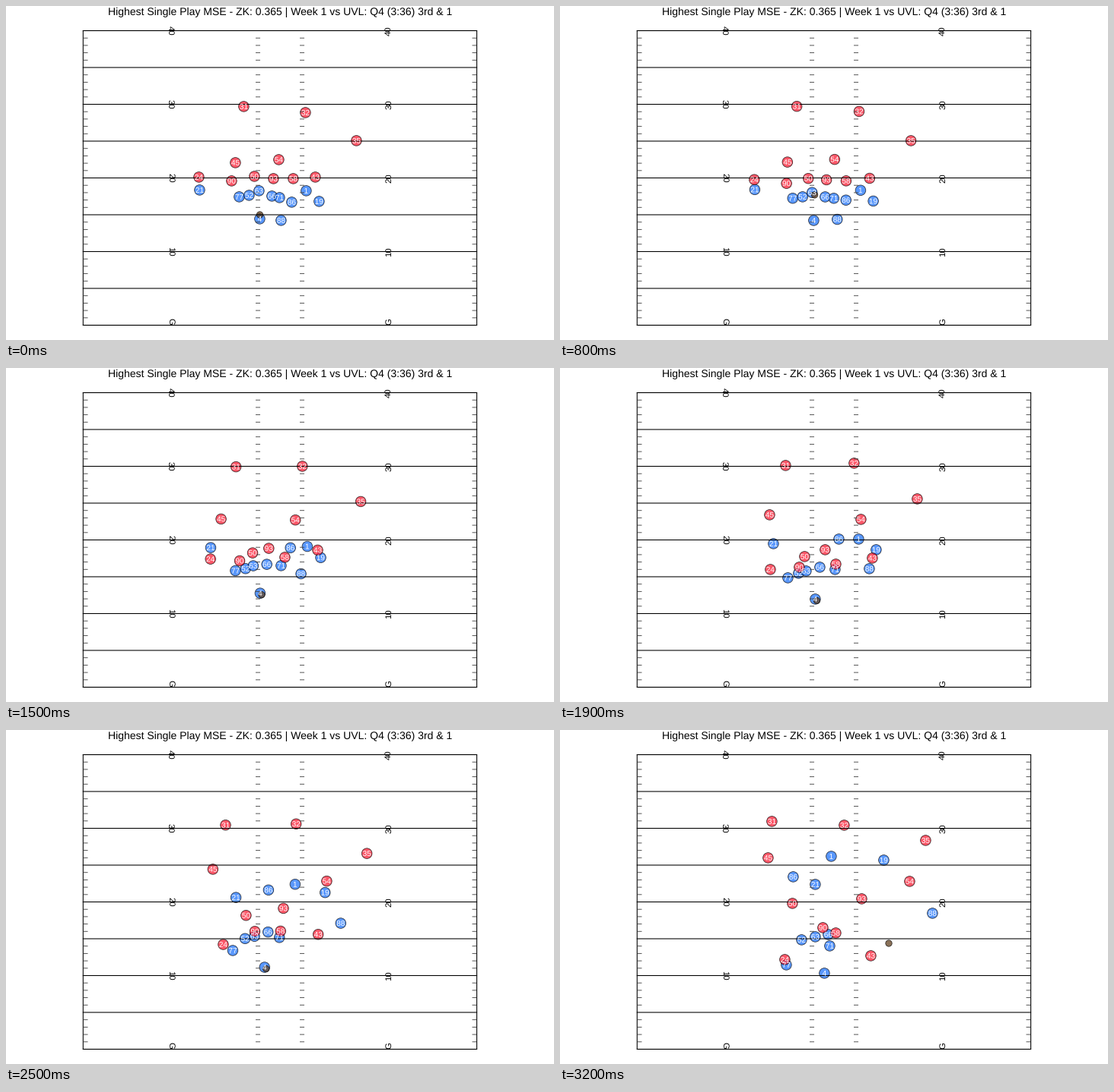
Write a matplotlib script that moves like this. It is 720 px wide and 440 px high and loops after 3.3 s.

```python
import numpy as np
import matplotlib.pyplot as plt
from matplotlib.animation import FuncAnimation
from matplotlib.patches import Circle, PathPatch, Rectangle
from matplotlib.textpath import TextPath
from matplotlib.transforms import Affine2D

W, H, DPI = 720, 440, 100
FRAMES, STEP = 33, 100
PX = 72 / DPI                                 # points per pixel
LEFT, RIGHT, TOP, GOAL = 101.3, 618.6, 32.5, 420.5
YARD = (GOAL - TOP) / 40
RED, BLUE, BROWN = "#fb1f35", "#2274fb", "#654321"

plt.rcParams["font.family"] = "Liberation Sans"
plt.rcParams["text.hinting"] = "none"
plt.rcParams["path.snap"] = False

# Key times (ms): players stand until SET, pass a midpoint at MID, stop at END
SET, MID, END = 500, 1900, 3200

# Jersey: stance, midpoint, finish
OFFENSE = {
    21: [(254, 242), (280, 231), (335, 203)],
    77: [(306, 251), (299, 276), (297, 309)],
    52: [(319, 249), (313, 270), (317, 276)],
    63: [(332, 243), (323, 267), (335, 272)],
    66: [(349, 250), (341, 262), (352, 269)],
    71: [(359, 252), (361, 265), (354, 284)],
    86: [(375, 258), (366, 225), (306, 193)],
    1: [(394, 243), (392, 225), (356, 166)],
    19: [(411, 257), (415, 239), (425, 171)],
    4: [(333, 280), (335, 304), (347, 320)],
    88: [(361, 282), (406, 264), (489, 241)],
}
DEFENSE = {
    24: [(253, 225), (276, 265), (295, 302)],
    90: [(296, 230), (314, 262), (345, 260)],
    50: [(326, 224), (321, 248), (305, 228)],
    93: [(351, 227), (348, 239), (396, 222)],
    58: [(377, 227), (362, 258), (362, 267)],
    43: [(406, 225), (410, 250), (408, 297)],
    45: [(301, 206), (275, 193), (273, 168)],
    54: [(358, 202), (395, 199), (459, 199)],
    31: [(312, 132), (296, 128), (278, 120)],
    32: [(393, 140), (386, 125), (373, 125)],
    35: [(460, 177), (469, 172), (480, 145)],
}
JERSEYS = [*OFFENSE, *DEFENSE]
KEYS = np.array([*OFFENSE.values(), *DEFENSE.values()]) + 0.4
CENTER, PASSER = JERSEYS.index(63), JERSEYS.index(4)

# Ball: drifts to the center, is snapped, carried by the passer, then thrown
SPOTTED, SNAP, CAUGHT, THROW = 400, 700, 1350, 2700
BALL_START, BALL_END = np.array([333.5, 275]), np.array([432, 281])


def run(t):
    """Positions of all players: ease out of the stance, then a smooth arc."""
    a, b, c = KEYS[:, 0], KEYS[:, 1], KEYS[:, 2]
    h1, h2 = MID - SET, END - MID
    d1, d2 = (b - a) / h1, (c - b) / h2
    v = (d1 * h2 + d2 * h1) / (h1 + h2)       # speed at the midpoint
    if t < MID:
        s = max(t - SET, 0) / h1
        return a + s * s * ((3 - 2 * s) * (b - a) + (s - 1) * h1 * v)
    s = t - MID
    return b + v * s + (d2 - v) / h2 * s * s


def ball_at(t, spots):
    snap_spot = KEYS[CENTER, 0] + (2, -1)
    hand = spots[PASSER] + (2, 2)
    if t < SNAP:
        start, goal, t0, t1 = BALL_START, snap_spot, 0, SPOTTED
    elif t < THROW:
        start, goal, t0, t1 = snap_spot, hand, SNAP, CAUGHT
    else:
        start, goal, t0, t1 = run(THROW)[PASSER] + 2, BALL_END, THROW, END
    return start + (goal - start) * min((t - t0) / (t1 - t0), 1)


fig = plt.figure(figsize=(W / DPI, H / DPI), dpi=DPI, facecolor="white")
ax = fig.add_axes([0, 0, 1, 1])
ax.set(xlim=(0, W), ylim=(H, 0))
ax.axis("off")


def label(x, y, s, size, **kw):
    kw = {"ha": "center", "va": "center", **kw}
    return ax.text(x, y, s, fontsize=size * PX, **kw)


def dot(color, r):
    return ax.add_patch(Circle((0, 0), r, fc=color, ec="black",
                               lw=0.8 * PX, alpha=0.75))


def number(n):
    """White jersey number as a path, so it can move by parts of a pixel."""
    path = TextPath((0, 0), str(n), size=9.96)
    box = path.get_extents()
    path = Affine2D().translate(-(box.x0 + box.x1) / 2,
                                -(box.y0 + box.y1) / 2).transform_path(path)
    return ax.add_patch(PathPatch(path, fc="white", ec="none", zorder=5))


def draw_field():
    label(W / 2, 12, "Highest Single Play MSE - ZK: 0.365 | "
          "Week 1 vs UVL: Q4 (3:36) 3rd & 1", 14, va="baseline")
    ticks = [(102, 107.5), (328, 334), (386, 392), (612.5, 618)]
    for n in range(41):
        y = GOAL - n * YARD
        if n % 5 == 0:
            ax.plot([LEFT, RIGHT], [y, y], color="black", lw=1.07 * PX)
        else:
            for span in ticks:
                ax.plot(span, [y, y], color="#444444", lw=0.9 * PX,
                        solid_capstyle="butt")
        if n % 10 == 0:
            s, ty = (str(n), y) if n else ("G", y - 4.6)
            label(LEFT + 12 * YARD - 1.8, ty, s, 11.4, rotation=270)
            label(RIGHT - 12 * YARD + 1, ty, s, 11.4, rotation=90)
    ax.add_patch(Rectangle((LEFT, TOP), RIGHT - LEFT, GOAL - TOP,
                           fill=False, ec="black", lw=1.07 * PX))


draw_field()
discs = [dot(BLUE if n in OFFENSE else RED, 6.8) for n in JERSEYS]
tags = [number(n) for n in JERSEYS]
ball = dot(BROWN, 4.2)


def update(k):
    t = k * STEP
    spots = run(t)
    for disc, tag, (x, y) in zip(discs, tags, spots):
        disc.center = x, y
        tag.set_transform(Affine2D().scale(1, -1).translate(x, y) + ax.transData)
    ball.center = ball_at(t, spots)
    return []


anim = FuncAnimation(fig, update, frames=FRAMES, interval=STEP,
                     init_func=lambda: update(0), repeat=True, repeat_delay=0)
plt.show()
```
